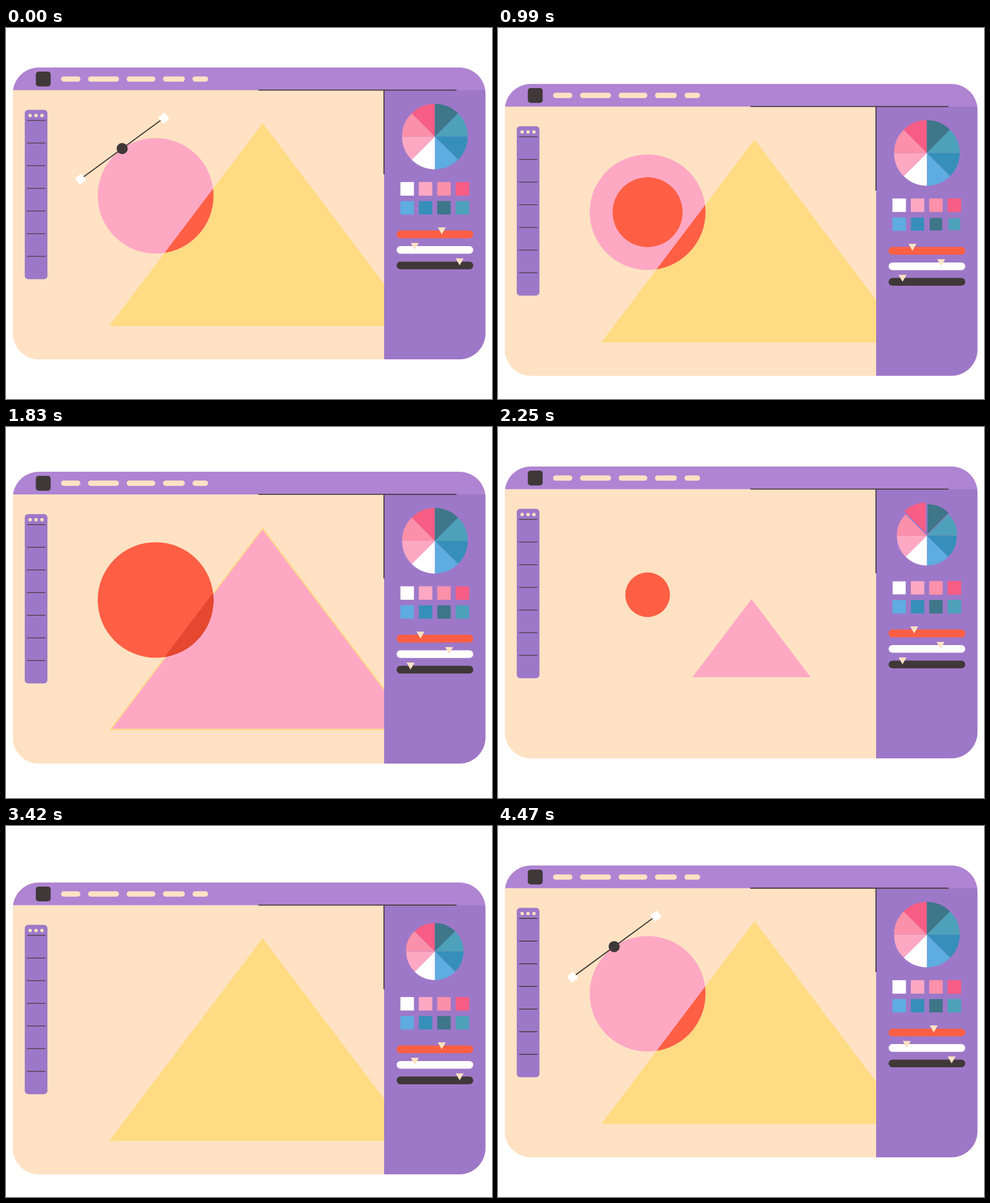
Animation, 856 px wide and 655 px high, one loop 4.5 s. Source, as an HTML page with a canvas:

```html
<!DOCTYPE html>
<html lang="en">
<head>
<meta charset="utf-8">
<title>Design editor</title>
<style>
  html, body { margin: 0; width: 100%; height: 100%; overflow: hidden; background: #fff; }
  canvas { display: block; width: 856px; height: 655px; }
</style>
</head>
<body>
<canvas id="stage" width="856" height="655"></canvas>
<script>
const ctx = document.getElementById('stage').getContext('2d');
const LOOP = 4500, TAU = Math.PI * 2;

const C = {
  cream: '#ffe2c3', header: '#af84d3', panel: '#9e78c8', ink: '#403838',
  yellow: '#ffdb83', red: '#ff5f44', deep: '#e5472f', white: '#ffffff',
  pink: '#ffa8c4', salmon: '#fb90aa', rose: '#f75d85',
  sky: '#5eace1', blue: '#368fba', slate: '#3e768a', teal: '#4da1ba'
};
const SWATCHES = [C.white, C.pink, C.salmon, C.rose, C.sky, C.blue, C.slate, C.teal];
// clockwise, starting with the slice left of twelve o'clock
const SLICES = [C.rose, C.slate, C.teal, C.blue, C.sky, C.white, C.pink, C.salmon];
const PILLS = [[97, 34], [144.5, 54.5], [212.5, 50.5], [276.5, 38.5], [328.5, 27.5]];
const SLIDERS = [[C.red, 767.5, 730], [C.white, 720, 780.5], [C.ink, 799, 712.5]];
const WHEEL = [[2080, 1], [2380, .86], [2850, 1.02], [3400, .87], [3640, 1]];

const ease = p => (1 - Math.cos(Math.PI * Math.min(1, Math.max(0, p)))) / 2;
const ramp = (t, start, length = 600) => ease((t - start) / length);
const pulse = (t, start, length = 600) => {
  const p = (t - start) / length;
  return p > 0 && p < 1 ? Math.sin(Math.PI * p) ** 2 : 0;
};
function track(steps, t) {
  let v = steps[0][1];
  for (let i = 1; i < steps.length; i++) {
    const [t0, a] = steps[i - 1], [t1, b] = steps[i];
    if (t > t0) v = a + (b - a) * ramp(t, t0, t1 - t0);
  }
  return v;
}

function shape(build) {
  const p = new Path2D();
  build(p);
  return p;
}
const disc = (x, y, r) => shape(p => p.arc(x, y, r, 0, TAU));
const box = (x, y, w, h, r = 0) => shape(p => p.roundRect(x, y, w, h, r));
const poly = (...pts) => shape(p => {
  pts.forEach(([x, y]) => p.lineTo(x, y));
  p.closePath();
});
function fill(path, color) {
  ctx.fillStyle = color;
  ctx.fill(path);
}
function line(x1, y1, x2, y2, width) {
  ctx.strokeStyle = C.ink;
  ctx.lineWidth = width;
  ctx.beginPath();
  ctx.moveTo(x1, y1);
  ctx.lineTo(x2, y2);
  ctx.stroke();
}
function overlap(a, b, color) {
  ctx.save();
  ctx.clip(a);
  fill(b, color);
  ctx.restore();
}

const bigDisc = s => disc(263.5, 296.2, 102 * s);
// the big triangle scaled about (ox, oy)
const bigTriangle = (s, ox, oy) => poly(...[[452, 168], [722, 526], [182, 526]]
  .map(([x, y]) => [ox + (x - ox) * s, oy + (y - oy) * s]));

function drawArtwork(t) {
  const shrink = 1 - ramp(t, 1906);
  const redScale = ramp(t, 650) * shrink;
  const pinkTri = ramp(t, 1280) * shrink;
  const yellow = t < 1895 ? 1 : ramp(t, 2546);
  const pinkDisc = t < 1260 ? 1 : ramp(t, 3450, 540);

  const triangles = [];
  if (yellow > 0) triangles.push([bigTriangle(yellow, 452, 347), C.yellow]);
  if (pinkTri > 0) triangles.push([bigTriangle(pinkTri, 443, 389), C.pink]);
  triangles.forEach(([path, color]) => fill(path, color));

  for (const [s, color, mix] of [[pinkDisc, C.pink, C.red], [redScale, C.red, C.deep]]) {
    if (s <= 0) continue;
    const d = bigDisc(s);
    fill(d, color);
    triangles.forEach(([path]) => overlap(d, path, mix));
  }
}

function drawHandle(t) {
  const arm = 1 - ramp(t, 110, 300) + ramp(t, 4080, 300);
  const knob = 1 - ramp(t, 330, 180) + ramp(t, 3960, 180);
  if (knob <= 0) return;
  ctx.save();
  ctx.translate(204.6, 212.9);
  ctx.rotate(-.634);
  if (arm > 0) {
    const reach = 91 * arm, half = 7.2 * Math.min(1, arm * 2);
    line(-reach, 0, reach, 0, 2);
    for (const x of [-reach, reach]) {
      fill(box(x - half, -half, half * 2, half * 2, 1.5), C.white);
    }
  }
  fill(disc(0, 0, 9.8 * knob), C.ink);
  ctx.restore();
}

function drawWheel(t) {
  const r = 57.8 * track(WHEEL, t);
  SLICES.forEach((color, i) => {
    const a = -Math.PI * .75 + i * Math.PI / 4, mid = a + Math.PI / 8;
    const out = 10 * (ramp(t, 2085 + i * 62, 300) - ramp(t, 2885 + i * 40, 300));
    const x = 755.4 + out * Math.cos(mid), y = 191.7 + out * Math.sin(mid);
    fill(shape(p => {
      p.moveTo(x, y);
      p.arc(x, y, r, a, a + Math.PI / 4);
      p.closePath();
    }), color);
  });
}

function drawSwatches(t) {
  SWATCHES.forEach((color, i) => {
    const dip = pulse(t, 168 + i * 57) + pulse(t, 2168 + i * 60);
    const h = 11.9 * (1 - .2 * dip);
    const x = 706.6 + (i % 4) * 32.4, y = 284 + (i >> 2) * 33.4;
    fill(box(x - h, y - h, h * 2, h * 2), color);
  });
}

function drawSliders(t) {
  SLIDERS.forEach(([color, from, to], i) => {
    const y = 364.4 + i * 27.4;
    const k = ramp(t, i * 53) - ramp(t, 2140 + i * 60);
    const x = from + (to - from) * k;
    fill(box(688, y - 6.8, 135, 13.6, 6.8), color);
    fill(poly([x - 7, y - 12.4], [x + 7, y - 12.4], [x, y - .2]), C.cream);
  });
}

function drawToolbars() {
  fill(box(12, 60, 833, 49.8), C.header);
  fill(box(52.5, 77, 26.2, 26.2, 5), C.ink);
  PILLS.forEach(([x, w]) => fill(box(x, 85.4, w, 9.4, 4.7), C.cream));

  fill(box(33, 144.5, 40, 299, 6), C.panel);
  for (let i = 0; i < 3; i++) fill(disc(42.5 + i * 10.4, 154.5, 3), C.cream);
  for (let i = 0; i < 7; i++) line(37, 163.2 + i * 40, 69.5, 163.2 + i * 40, 1.3);
}

function draw(t) {
  ctx.fillStyle = C.white;
  ctx.fillRect(0, 0, 856, 655);
  ctx.save();
  ctx.translate(0, 15 * (1 - Math.cos(TAU * t / (LOOP / 2))));
  ctx.clip(box(12, 69.8, 832.5, 515.2, 46));
  fill(box(12, 60, 833, 530), C.cream);
  drawArtwork(t);
  drawHandle(t);
  fill(box(666, 109, 179, 480), C.panel);
  drawToolbars();
  line(444.5, 109.7, 793.5, 109.7, 1.8);
  line(665.7, 109.7, 665.7, 258, 1.8);
  drawWheel(t);
  drawSwatches(t);
  drawSliders(t);
  ctx.restore();
}

let begin;
function tick(now) {
  begin ??= now;
  draw((now - begin) % LOOP);
  requestAnimationFrame(tick);
}
draw(0);
requestAnimationFrame(tick);
</script>
</body>
</html>
```
